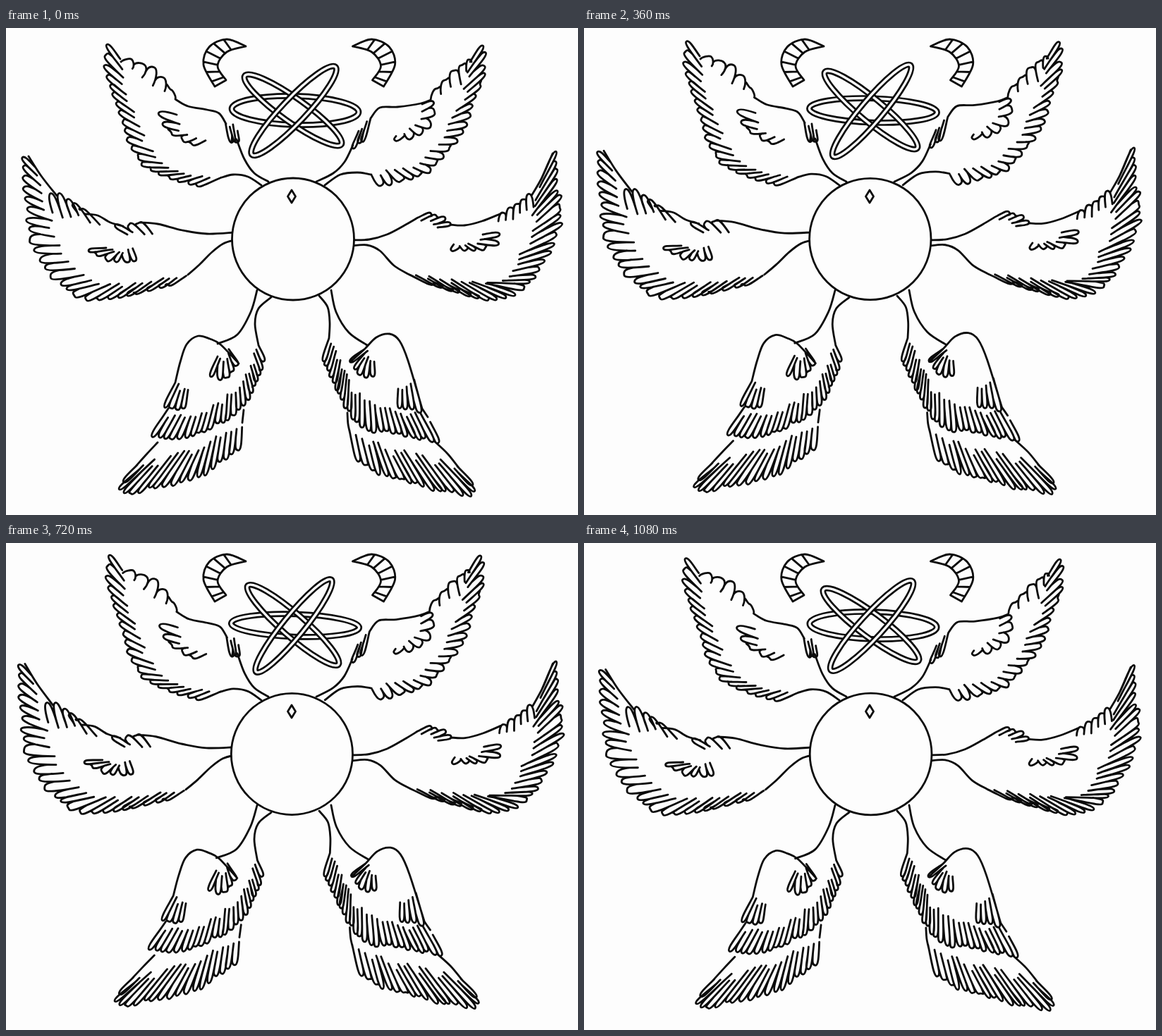
An HTML page for the animation above (1200 ms loop, 811 by 691 pixels).

```html
<!DOCTYPE html>
<html lang="en">
<head>
<meta charset="utf-8">
<title>Six wings</title>
<style>
html, body { margin: 0; width: 100%; height: 100%; overflow: hidden; background: #fdfdfd; }
svg { display: block; width: 811px; height: 691px; }
path, ellipse, circle { fill: none; stroke: #0b0b0b; stroke-width: 2.8; stroke-linecap: round; stroke-linejoin: round; }
.tube { stroke-width: 8.8; }
.gap { stroke: #fdfdfd; stroke-width: 3.4; }
.body { fill: #fdfdfd; }
</style>
</head>
<body>
<svg id="stage" viewBox="0 0 811 691"></svg>
<script>
const stage = document.getElementById('stage');

function make(tag, attrs) {
  const el = document.createElementNS('http://www.w3.org/2000/svg', tag);
  for (const key in attrs) el.setAttribute(key, attrs[key]);
  return el;
}
const add = (tag, attrs) => stage.appendChild(make(tag, attrs));

let seed = 7;
function random() {
  seed = (seed * 16807) % 2147483647;
  return seed / 2147483647;
}
const vary = amount => (random() * 2 - 1) * amount;
const fmt = list => list.map(v => v.toFixed(1)).join(' ');

// Smooth line through a few key points
function curve(text) {
  const n = text.split(' ').map(Number), p = [];
  for (let i = 0; i < n.length; i += 2) p.push([n[i], n[i + 1]]);
  let d = 'M' + fmt(p[0]);
  for (let i = 0; i + 1 < p.length; i++) {
    const a = p[i - 1] || p[i], b = p[i], c = p[i + 1], e = p[i + 2] || c;
    d += 'C' + fmt([b[0] + (c[0] - a[0]) / 6, b[1] + (c[1] - a[1]) / 6,
      c[0] - (e[0] - b[0]) / 6, c[1] - (e[1] - b[1]) / 6, ...c]);
  }
  return d;
}

// Point at a share u of the length of a curve
function along(text) {
  const path = make('path', { d: curve(text) }), length = path.getTotalLength();
  return u => {
    const p = path.getPointAtLength(Math.min(1, Math.max(0, u)) * length);
    return [p.x, p.y];
  };
}

function bezier(a, b, c, d, t) {
  const s = 1 - t;
  return [0, 1].map(i => s * s * s * a[i] + 3 * s * s * t * b[i] + 3 * s * t * t * c[i] + t * t * t * d[i]);
}

// Feathers reach from the root line to the tip line; each one tucks behind the last
function feathers([count, tipLine, rootLine]) {
  const tipAt = along(tipLine), rootAt = along(rootLine);
  let from = rootAt(0), d = 'M' + fmt(from);
  for (let i = 0; i < count; i++) {
    const a = rootAt(i / count), b = rootAt((i + 1) / count);
    const mid = [(a[0] + b[0]) / 2, (a[1] + b[1]) / 2];
    const end = tipAt((i + vary(0.18)) / (count - 1)), reach = 1 + vary(0.07);
    const x = (end[0] - mid[0]) * reach, y = (end[1] - mid[1]) * reach;
    const tip = [mid[0] + x, mid[1] + y], length = Math.hypot(x, y) || 1;
    let w = Math.min(5, length * 0.3) / length;
    if (-y * (b[0] - a[0]) + x * (b[1] - a[1]) < 0) w = -w;
    const push = (p, k) => [p[0] + x * k, p[1] + y * k];
    const left = [tip[0] + y * w, tip[1] - x * w], right = [tip[0] - y * w, tip[1] + x * w];
    const back = push(b, 0.55), deep = push(b, vary(0.2));
    d += 'C' + fmt([...push(from, 0.35), ...left, ...tip]) + 'C' + fmt([...right, ...back, ...deep]);
    if (i < count - 1) {
      from = bezier(tip, right, back, deep, 0.55 + random() * 0.4);
      d += 'M' + fmt(from);
    }
  }
  return d;
}

// rows: feather count, tip line, root line. turn and grow: change per step about the root
const wings = [
  { root: [370, 215], turn: 0.0055, grow: 0.0013,
    rows: [
      [20, '144 25 140 59 160 115 172 157 193 193 232 213 270 224', '162 44 168 90 184 130 208 180 244 204 303 213'],
      [5, '178 45 214 60 234 88', '163 48 188 66 216 84 240 101'],
      [3, '319 161 328 163', '311 134 328 144'],
      [5, '217 121 224 140 244 158 264 165', '242 123 246 144 262 152 284 159']],
    lines: ['240 101 258 111 285 116 302 121 312 136', '327 158 338 186 352 206 372 218',
      '303 213 322 208 343 211 362 223'] },
  { root: [440, 215], turn: -0.006, grow: 0.0017,
    rows: [
      [20, '677 24 680 58 664 101 651 144 613 190 596 207 532 225', '658 48 650 95 630 135 604 172 578 196 518 208'],
      [5, '656 45 634 60 610 87', '660 48 644 78 626 90 602 102'],
      [3, '506 160 492 170', '517 128 500 146'],
      [6, '607 105 607 130 584 155 552 160', '590 108 584 138 554 152']],
    lines: ['602 102 588 107 555 112 530 113 517 128', '492 166 480 190 464 206 440 218',
      '518 208 498 205 474 208 452 223'] },
  { root: [322, 300], turn: 0.006, grow: 0.007,
    rows: [
      [25, '24 182 26 230 36 306 66 355 116 386 182 377 230 365', '42 198 64 275 92 332 125 362 175 364 258 350'],
      [5, '63 236 76 236 108 258', '66 262 96 268 130 276'],
      [3, '154 279 190 276', '172 293 206 290'],
      [6, '117 316 144 330 185 332', '142 312 160 318 179 311']],
    lines: ['32 182 50 210 72 238', '112 264 130 266 148 276 166 281',
      '190 276 215 278 250 287 285 292 324 290', '258 350 274 336 292 318 308 306 324 301'] },
  { root: [492, 303], turn: -0.005, grow: 0.0025,
    rows: [
      [27, '780 174 784 230 787 275 764 332 740 364 692 386 606 364', '758 216 746 285 722 336 684 362 572 350'],
      [5, '741 234 728 246 704 262', '748 254 722 268 698 276'],
      [4, '632 278 622 269 602 264', '612 283 600 276 584 269'],
      [6, '701 292 690 312 632 316', '676 293 666 306 634 308']],
    lines: ['775 178 760 212 745 238', '700 264 675 274 650 280 630 279',
      '584 269 565 280 540 293 515 300 490 301', '490 309 512 308 530 316 550 337 572 350'] },
  { root: [352, 375], turn: 0.0055, grow: 0,
    rows: [
      [4, '225 538 252 541', '240 503 258 514'],
      [23, '206 582 250 583 292 567 334 540 350 514 366 474', '222 552 260 550 300 535 332 508 346 484 358 450'],
      [18, '165 646 161 662 215 652 268 640 306 615 331 598', '186 620 196 620 232 611 270 600 304 580 335 560'],
      [5, '291 493 312 498 329 478', '300 466 312 468 318 459']],
    lines: ['240 503 247 474 256 449 272 437 289 441 304 449 330 476', '356 372 347 403 328 435 300 448',
      '376 382 358 398 353 420 358 450', '230 540 222 552', '215 588 200 604 182 624', '335 560 337 542'] },
  { root: [455, 375], turn: -0.005, grow: 0,
    rows: [
      [4, '558 540 588 545', '556 512 580 504'],
      [25, '450 470 463 500 480 535 508 567 560 577 614 588', '458 440 474 478 494 516 530 535 565 548 598 552'],
      [18, '660 646 661 664 615 657 555 640 525 630 500 616', '640 622 630 620 590 613 545 600 520 588 488 576'],
      [5, '487 474 504 493 522 496', '508 456 512 470 522 470']],
    lines: ['488 474 508 456 525 439 544 434 558 444 570 472 590 540', '461 372 468 403 486 432 512 450',
      '444 380 456 396 459 418 458 440', '590 540 598 552', '608 587 626 604 642 624', '484 546 485 562 488 576'] }
];

for (const wing of wings) {
  const d = wing.rows.map(feathers).concat(wing.lines.map(curve)).join('');
  wing.el = add('path', { d });
}

const ball = add('circle', { class: 'body', cy: 299.5 });
add('path', { d: 'M405 230L410.5 239L405 248L399.5 239Z' });

// Banded horn and its mirror image
const outer = '340 26 313 16 288 27 280 52 296 83', inner = '340 26 313 34 300 54 312 74';
const outerAt = along(outer), innerAt = along(inner);
let horn = curve(outer) + 'L312 74' + curve(inner);
for (let u = 0.28; u < 0.95; u += 0.13) horn += 'M' + fmt(outerAt(u)) + 'L' + fmt(innerAt(u));
add('path', { d: horn });
add('path', { d: horn, transform: 'translate(831.5 0) scale(-1 1)' });

// Values at rest, then change per step
const rings = [
  { x: 410, y: 117, a: 90, b: 20.5, angle: 1.5, da: 0.2, db: -1.1, turn: 0.1 },
  { x: 407, y: 116.5, a: 84, b: 17, angle: 35.5, da: 0.3, db: -0.2, turn: 1.4 },
  { x: 408, y: 117.5, a: 86, b: 17, angle: -46.5, da: -0.4, db: -0.5, turn: -1.1 }
];
for (const ring of rings) ring.els = ['tube', 'gap'].map(c => add('ellipse', { class: c }));

function pose(k) {
  for (const { el, root: [x, y], turn, grow } of wings) {
    el.setAttribute('transform',
      `translate(${x} ${y}) rotate(${turn * k * 180 / Math.PI}) scale(${1 + grow * k}) translate(${-x} ${-y})`);
  }
  for (const r of rings) {
    for (const el of r.els) {
      el.setAttribute('rx', r.a + r.da * k);
      el.setAttribute('ry', r.b + r.db * k);
      el.setAttribute('transform', `translate(${r.x} ${r.y}) rotate(${r.angle + r.turn * k})`);
    }
  }
  ball.setAttribute('cx', 407 - k * 0.4);
  ball.setAttribute('r', 86.5 - k * 0.1);
}

// Six poses, there and back
const start = performance.now();
function frame(now) {
  const step = Math.floor(Math.max(0, now - start) / 120) % 10;
  pose(Math.min(step, 10 - step));
  requestAnimationFrame(frame);
}
pose(0);
requestAnimationFrame(frame);
</script>
</body>
</html>
```
